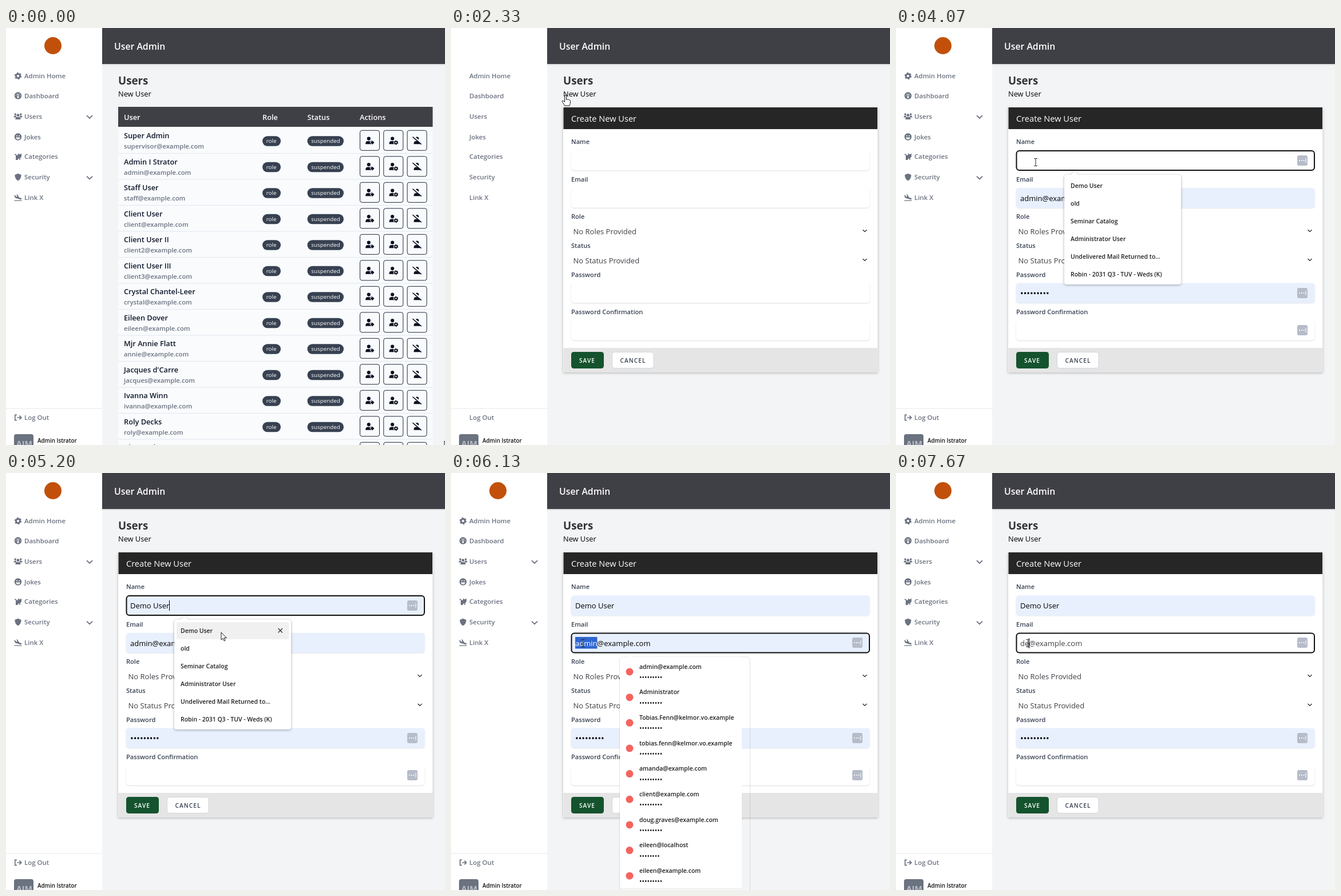
These frames come from a looping animation (767 px wide and 730 px high, 8000 ms). An HTML page:

```html
<!DOCTYPE html>
<html lang="en">
<head>
<meta charset="utf-8">
<title>User Admin</title>
<style>
html, body { margin: 0; height: 100%; overflow: hidden; background: #f3f4f6; }
svg { display: block; width: 100vw; height: 100vh; }
text { font: 400 13px "Open Sans", "Noto Sans", sans-serif; white-space: pre; }
.nav { font-size: 11.45px; font-weight: 600; fill: #6b7280; }
.name { font-size: 12.75px; font-weight: 600; fill: #0f172a; }
.mail { font-size: 11.25px; font-weight: 600; fill: #6b7280; }
.head { font-size: 12.8px; font-weight: 600; fill: #fff; }
.pill { font-size: 9.8px; fill: #fff; }
.label { font-size: 11.1px; font-weight: 600; fill: #374151; }
.value { fill: #3f3f46; }
.button { font-size: 10.2px; font-weight: 600; letter-spacing: 1.02px; }
.item { font-size: 10.45px; font-weight: 600; fill: #1f1f1f; }
.dots { font-size: 15px; }
.item.dots { font-size: 11.9px; font-weight: 400; }
.field { fill: #fff; filter: drop-shadow(0 1px 1px #0002); }
.filled { fill: #e8f0fe; }
.ring { fill: none; stroke: #111; stroke-width: 2; }
.line { fill: none; stroke: currentColor; }
.card { filter: drop-shadow(0 1px 2px #0004); }
.popup { fill: #fff; filter: drop-shadow(0 1px 2px #0005); }

/* Hard changes: each part is switched on and off within the 8 s loop. */
[style*="--k"] { animation: var(--k) 8s step-end infinite; }
@keyframes list { 0% { opacity: 1 } 29.08% { opacity: 0 } }
@keyframes form { 0% { opacity: 0 } 29.08% { opacity: 1 } }
@keyframes icons { 0% { opacity: 1 } 29.08% { opacity: 0 } 29.95% { opacity: 1 } }
@keyframes logo { 0% { opacity: 1 } 29.08% { opacity: 0 } 30.83% { opacity: 1 } }
@keyframes autofill { 0% { opacity: 0 } 31.58% { opacity: 1 } }
@keyframes mailFilled { 0% { opacity: 0 } 31.58% { opacity: 1 } 93.33% { opacity: 0 } }
@keyframes nameFocus { 0% { opacity: 0 } 44.08% { opacity: 1 } 74.95% { opacity: 0 } }
@keyframes nameCaret { 0% { opacity: 0 } 44.08% { opacity: 1 } 50.83% { opacity: 0 } }
@keyframes namePopup { 0% { opacity: 0 } 44.08% { opacity: 1 } 69.95% { opacity: 0 } }
@keyframes nameFilled { 0% { opacity: 0 } 57.45% { opacity: 1 } }
@keyframes endCaret { 0% { opacity: 0 } 57.45% { opacity: 1 } 74.95% { opacity: 0 } }
@keyframes mailFocus { 0% { opacity: 0 } 74.95% { opacity: 1 } }
@keyframes mailMarked { 0% { opacity: 0 } 76.58% { opacity: 1 } 93.33% { opacity: 0 } }
@keyframes typedOne { 0% { opacity: 0 } 93.33% { opacity: 1 } 95.83% { opacity: 0 } }
@keyframes typedTwo { 0% { opacity: 0 } 95.83% { opacity: 1 } }
@keyframes mailPopup { 0% { opacity: 0 } 74.95% { opacity: 1 } 94.08% { opacity: 0 } }

@keyframes arrow {
  0% { opacity: 1 } 15% { opacity: 0 } 37.9% { opacity: 1 } 38.8% { opacity: 0 }
  54.95% { opacity: 1 } 72.9% { opacity: 0 }
}
@keyframes hand { 0% { opacity: 0 } 15% { opacity: 1 } 37.9% { opacity: 0 } }
@keyframes beam {
  0% { opacity: 0 } 38.8% { opacity: 1 } 54.95% { opacity: 0 } 72.9% { opacity: 1 }
}
@keyframes pointer {
  0%, .6% { transform: translate(766px, 723px); animation-timing-function: cubic-bezier(.3, .2, .6, .9) }
  10.9% { transform: translate(347px, 151px); animation-timing-function: ease-out }
  15.8%, 36.8% { transform: translate(200px, 118px) }
  39.1%, 40.7% { transform: translate(243px, 232px) }
  40.8%, 53.5% { transform: translate(244px, 235px); animation-timing-function: ease-in-out }
  57.4%, 59.4% { transform: translate(345px, 272px); animation-timing-function: ease-out }
  64.9% { transform: translate(376px, 279px) }
  69.1%, 70.2% { transform: translate(372px, 277px); animation-timing-function: ease-in-out }
  73.7%, 100% { transform: translate(230.5px, 298px) }
}
#pointer { animation: pointer 8s linear infinite; }
</style>
</head>
<body>
<svg viewBox="0 0 767 730">
  <defs>
    <linearGradient id="shade" x2="0" y2="1">
      <stop stop-color="#000" stop-opacity=".16"/>
      <stop offset="1" stop-color="#000" stop-opacity="0"/>
    </linearGradient>
    <g id="gear">
      <circle r="3.5" class="line" stroke-width="2.9"/>
      <circle r="5.2" class="line" stroke-width="2" stroke-dasharray="2.7 2.745"/>
    </g>
    <g id="gauge">
      <circle r="6.2" fill="currentColor"/>
      <path d="M0 2.5V-3M-3.6 0h.1M3.5 0h.1M-2.5-2.8h.1M2.4-2.8h.1" class="line" style="color:#fff" stroke-width="1.4" stroke-linecap="round"/>
      <circle cy="2.6" r="1.7" fill="#fff"/>
    </g>
    <g id="group" fill="currentColor">
      <circle cx="-4.8" cy="-3.4" r="1.8"/><circle cx="4.8" cy="-3.4" r="1.8"/><circle cy="-1.8" r="2.4"/>
      <path d="M-7.5 2q0-3 2.6-3h1.6q0 1.8 1.2 3ZM7.5 2q0-3-2.6-3H3.3q0 1.8-1.2 3ZM-4.6 5.6q0-4 3.2-4h2.8q3.2 0 3.2 4Z"/>
    </g>
    <g id="smile">
      <circle r="6.2" fill="currentColor"/>
      <path d="M-3.8 1h7.6q-.5 3.4-3.8 3.4T-3.8 1Z" fill="#fff"/>
      <circle cx="-2" cy="-1.8" r="1" fill="#fff"/><circle cx="2" cy="-1.8" r="1" fill="#fff"/>
    </g>
    <path id="cat" fill="currentColor" d="M0-5.8 2-4h2l2-1.8V0Q5.6 1.8 4 2v3.8H2.3V3L-1 5h1.2v1H-4V-1.8Q-4-3-5.2-3H-6v-1.6h1.4q2 .4 2.2 2.6Q-1-3 .5-2.6L0-3Z"/>
    <path id="shield" fill="currentColor" d="M0-6.2 5.6-4Q5.8 3.6 0 6.2-5.8 3.6-5.6-4Z"/>
    <path id="plane" fill="currentColor" d="M-6.5 4.4h13v1.4h-13ZM-6.5-4.6l1.4.2L-3.6-2l2.2.6-1.2-4.4 1.6.4L2-.2l2.6.8q2 .8 1.8 2-1 .8-2.6.4l-8.4-2.4Q-6-.6-6.5-4.6Z"/>
    <path id="exit" class="line" stroke-width="1.7" d="M-2-4.6h-3.2v9.2H-2M-1.5 0h7M2.4-3.4 5.8 0 2.4 3.4"/>
    <path id="chevron" class="line" stroke-width="1.8" d="M-5-2.4 0 2.4 5-2.4"/>
    <g id="person" fill="currentColor">
      <circle cx="-1.7" cy="-3.4" r="3.1"/>
      <path d="M-7.4 6.2q0-5.2 4-5.2H0q3.4 0 3.8 5.2Z"/>
    </g>
    <g id="tagged">
      <use href="#person"/>
      <path d="M1 0h4l3.4 3.6-3.6 3.8L1 4Z" fill="currentColor" stroke="#f8fafc" stroke-width="1"/>
      <circle cx="2.9" cy="2" r=".7" fill="#f8fafc"/>
    </g>
    <g id="managed">
      <use href="#person"/>
      <circle cx="4.6" cy="3.6" r="4.5" fill="#f8fafc"/>
      <use href="#gear" transform="translate(4.6 3.6) scale(.62)"/>
    </g>
    <g id="blocked">
      <use href="#person" x="1.7"/>
      <path d="M-6.4-7.6 8.6 5.2" class="line" style="color:#f8fafc" stroke-width="2.6"/>
      <path d="M-7.6-6.4 7.6 6.6" class="line" stroke-width="1.4"/>
    </g>
    <g id="filler">
      <rect x="-9" y="-9" width="18" height="18" rx="3" fill="#b6bcc9"/>
      <path d="M-5 0h.1M-1.2 0h.1M2.6 0h.1" stroke="#fff" stroke-width="2" stroke-linecap="round"/>
      <path d="M6-4v8" stroke="#fff"/>
    </g>
  </defs>

  <rect width="767" height="730" fill="#f3f4f6"/>
  <rect x="168" y="62" width="599" height="4" fill="url(#shade)"/>
  <rect x="168" width="599" height="63" fill="#3f3f46"/>
  <text x="189" y="38.3" fill="#fff" style="font-size:15.8px;font-weight:600">User Admin</text>
  <text x="196" y="98.5" fill="#333338" style="font-size:18.7px;font-weight:700">Users</text>
  <text x="196" y="119.5" style="font-size:12.8px">New User</text>

  <rect width="168" height="730" fill="#fff"/>
  <circle cx="82" cy="31" r="15" fill="#c2500a" style="--k:logo"/>
  <g id="labels"></g>
  <g id="navIcons" color="#6b7280" style="--k:icons"></g>
  <path d="M0 666h168" stroke="#e5e7eb"/>
  <rect x="14" y="711" width="34" height="34" rx="4" fill="#6b7280"/>
  <text x="18" y="733" fill="#b9bdc6" style="font-size:14.2px;font-weight:700">AIM</text>
  <text x="55" y="725.7" fill="#111" style="font-size:9.8px;font-weight:600">Admin Istrator</text>

  <g id="list" style="--k:list"></g>

  <g style="--k:form">
    <g class="card">
      <rect x="196" y="139" width="549.5" height="464" fill="#fff"/>
      <rect x="196.5" y="139" width="548.5" height="38" fill="#262626"/>
      <rect x="196.5" y="560" width="548.5" height="43" fill="#e5e5e5"/>
    </g>
    <text x="210" y="163.8" fill="#fff" style="font-size:14.6px">Create New User</text>
    <g id="fields"></g>
    <text x="213.5" y="360.8" class="value">No Roles Provided</text>
    <text x="213.5" y="411.6" class="value">No Status Provided</text>
    <use href="#chevron" transform="translate(723 355) scale(.7)" color="#262626"/>
    <use href="#chevron" transform="translate(723 405.7) scale(.7)" color="#262626"/>
    <rect x="210" y="567" width="57" height="29" rx="4.5" fill="#14532d"/>
    <text x="224" y="585.5" class="button" fill="#fff">SAVE</text>
    <rect x="281.5" y="567.5" width="72.5" height="28" rx="4.5" fill="#fff" stroke="#d1d5db"/>
    <text x="295.5" y="585.5" class="button" fill="#374151">CANCEL</text>

    <g style="--k:autofill">
      <rect x="210" y="446.5" width="521.5" height="35" rx="5" class="filled"/>
      <text x="217" y="469.6" class="dots">•••••••••</text>
      <use href="#filler" x="710" y="464"/>
      <use href="#filler" x="710" y="529"/>
    </g>
    <g style="--k:nameFilled">
      <rect x="210" y="214.5" width="521.5" height="35" rx="5" class="filled"/>
      <text x="217" y="237.2">Demo User</text>
    </g>
    <g style="--k:nameFocus">
      <rect x="210.5" y="215" width="520.5" height="34" rx="5" class="ring"/>
      <use href="#filler" x="710" y="232"/>
    </g>
    <path d="M217.5 223v18" stroke="#000" style="--k:nameCaret"/>
    <path d="M285.5 223v18" stroke="#000" style="--k:endCaret"/>

    <g style="--k:mailFilled">
      <rect x="210" y="280" width="521.5" height="35" rx="5" class="filled"/>
      <text x="217" y="302.5">admin@example.com</text>
    </g>
    <g style="--k:mailFocus">
      <rect x="210.5" y="280.5" width="520.5" height="34" rx="5" class="ring"/>
      <use href="#filler" x="710" y="297"/>
    </g>
    <g style="--k:mailMarked">
      <rect x="217" y="287" width="38.5" height="20.5" fill="#2f66d0"/>
      <text x="217" y="302.5" fill="#fff">admin</text>
    </g>
    <g style="--k:typedOne">
      <text x="217" y="302.5" class="value">d@example.com</text>
      <path d="M225.5 289v18" stroke="#000"/>
    </g>
    <g style="--k:typedTwo">
      <text x="217" y="302.5" class="value">de@example.com</text>
      <path d="M232.5 289v18" stroke="#000"/>
    </g>

    <g style="--k:namePopup">
      <path class="popup" d="M298 257h7l7-6 7 6h175q4 0 4 4v184q0 4-4 4H298q-4 0-4-4V261q0-4 4-4Z"/>
      <g style="--k:nameFilled">
        <rect x="298" y="261" width="196.5" height="30" rx="3" fill="#f0f0f0"/>
        <path d="m475.5 272 7.5 7.5m0-7.5-7.5 7.5" stroke="#333" stroke-width="1.3"/>
      </g>
      <g id="names"></g>
    </g>
    <g style="--k:mailPopup">
      <rect x="294.5" y="322" width="228" height="420" rx="5" fill="none" stroke="#0000001c"/>
      <path fill="#fff" d="M300 322h8l4-3 4 3h192v420H295V327q0-5 5-5Z"/>
      <g id="mails"></g>
      <path d="M295 728h213" stroke="#ddd"/>
    </g>
  </g>

  <g id="pointer">
    <path style="--k:arrow" fill="#fff" stroke="#000" stroke-width=".9" d="M0 0V13.2L3.1 10.4 5.2 15 7.2 14.1 5.2 9.7H9.4Z"/>
    <path style="--k:hand" fill="#fff" stroke="#000" stroke-width=".9" d="M-1.4.9a1.4 1.4 0 0 1 2.8 0V7.2q1.4-1.2 2.7.3 1.5-.9 2.4.6 1.9-.5 1.9 1.5V13q0 2.5-1.5 5H-1.4Q-3 15-5 12.2-6.6 10-5.2 9.2-4 8.8-1.4 11.6Z"/>
    <path style="--k:beam" fill="none" stroke="#222" d="M-3-6.5h2.2L0-6 .8-6.5H3M0-6V6M-3 6.5h2.2L0 6l.8.5H3"/>
  </g>
</svg>
<script>
const fill = (id, parts) => { document.getElementById(id).innerHTML = parts.join(''); };
const text = (x, y, cls, s) => `<text x="${x}" y="${y}" class="${cls}">${s}</text>`;
const icon = (id, x, y) => `<use href="#${id}" x="${x}" y="${y}"/>`;

const nav = [
  ['Admin Home', 'gear', 84], ['Dashboard', 'gauge', 118.5], ['Users', 'group', 154.5],
  ['Jokes', 'smile', 190.5], ['Categories', 'cat', 225], ['Security', 'shield', 261],
  ['Link X', 'plane', 297], ['Log Out', 'exit', 682]
];
fill('labels', nav.map(([label, , y]) => text(32, y + 4.2, 'nav', label)));
fill('navIcons', [
  ...nav.map(([, id, y]) => icon(id, 21, y)),
  icon('chevron', 146, 155.5), icon('chevron', 146, 262)
]);

const users = [
  ['Super Admin', 'supervisor'], ['Admin I Strator', 'admin'], ['Staff User', 'staff'],
  ['Client User', 'client'], ['Client User II', 'client2'], ['Client User III', 'client3'],
  ['Crystal Chantel-Leer', 'crystal'], ['Eileen Dover', 'eileen'], ['Mjr Annie Flatt', 'annie'],
  ["Jacques d'Carre", 'jacques'], ['Ivanna Winn', 'ivanna'], ['Roly Decks', 'roly'],
  ['Rita Bookes', 'rita']
];
const pill = (x, y, w, s) =>
  `<rect x="${x}" y="${y - 8.7}" width="${w}" height="17.4" rx="8.7" fill="#374151"/>` + text(x + 6.8, y + 3.4, 'pill', s);
const action = (id, x, y) =>
  `<rect x="${x}" y="${y}" width="34" height="35" rx="3.5" fill="#f8fafc" stroke="#1e293b"/>` + icon(id, x + 17, y + 17.7);
const row = ([name, local], i) => {
  const y = 174 + 45.5 * i;
  return `<path d="M196 ${y + 45.5}h549.5" stroke="#e2e8f0"/>` +
    text(206, y + 19, 'name', name) + text(206, y + 37.3, 'mail', local + '@example.com') +
    pill(448, y + 24, 32, 'role') + pill(526.5, y + 24, 63.5, 'suspended') +
    ['tagged', 'managed', 'blocked'].map((id, n) => action(id, 618.5 + 41.3 * n, y + 5.3)).join('');
};
fill('list', [
  '<rect x="196" y="140" width="549.5" height="590" fill="#f9fbfd"/>',
  '<rect x="196" y="138" width="549.5" height="35" fill="#3f3f46"/>',
  ...[['User', 206], ['Role', 448], ['Status', 526.5], ['Actions', 618]].map(([s, x]) => text(x, 160.5, 'head', s)),
  '<g color="#0b1120">', ...users.map(row), '</g>'
]);

const labels = [['Name', 199], ['Email', 264.5], ['Role', 330], ['Status', 380.5], ['Password', 431.5], ['Password Confirmation', 496.5]];
fill('fields', [
  ...labels.map(([s, y]) => text(210, y + 4.2, 'label', s)),
  ...[214.5, 280, 446.5, 512].map(y => `<rect x="210" y="${y}" width="521.5" height="34.5" rx="5" class="field"/>`)
]);

const names = ['Demo User', 'old', 'Seminar Catalog', 'Administrator User',
  'Undelivered Mail Returned to...', 'Robin - 2031 Q3 - TUV - Weds (K)'];
fill('names', names.map((s, i) => text(305, 279.8 + 31 * i, 'item', s)));

const mails = ['admin@example.com', 'Administrator', 'Tobias.Fenn@kelmor.vo.example',
  'tobias.fenn@kelmor.vo.example', 'amanda@example.com', 'client@example.com',
  'doug.graves@example.com', 'eileen@localhost', 'eileen@example.com'];
fill('mails', mails.map((s, i) => {
  const y = 339 + 44.65 * i;
  return `<circle cx="312" cy="${y + 9}" r="6.5" fill="#f4645f"/>` + text(329, y + 3.6, 'item', s) +
    text(329, y + 23, 'item dots', '•'.repeat(i === 7 ? 8 : 9));
}));
</script>
</body>
</html>
```
